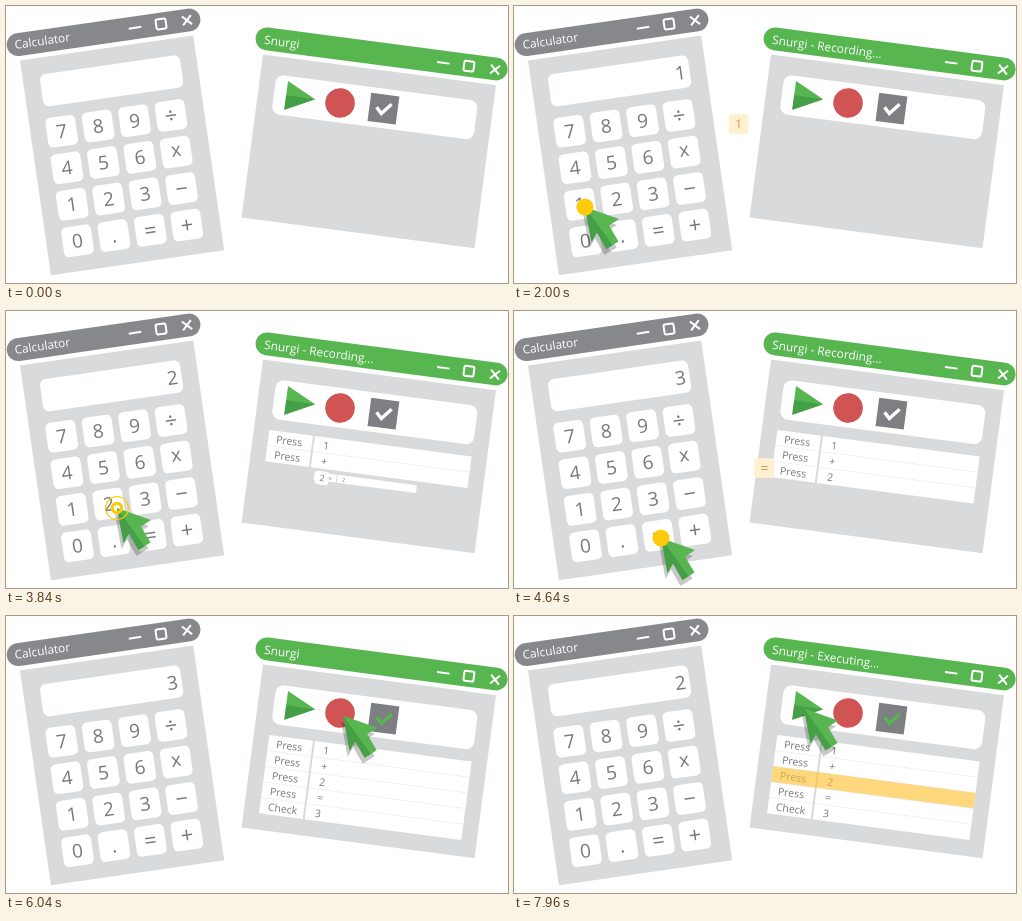
Recreate the animation shown at these times as an HTML page. Size 502 by 277 pixels, loop 8000 ms.

```html
<!DOCTYPE html>
<html lang="en">
<head>
<meta charset="utf-8">
<title>Calculator test recording</title>
<style>
  html, body { margin: 0; width: 100%; height: 100%; overflow: hidden; background: #fff; }
  svg { display: block; width: 100vw; height: 100vh; font-family: "Open Sans", "Noto Sans", sans-serif; }
  text { fill: #77787b; }
  .title { fill: #fff; font-size: 11.9px; }
  .cell { font-size: 10.5px; }
  .icon { fill: none; stroke: #fff; stroke-width: 2; }
</style>
</head>
<body>
<svg id="stage" viewBox="0 0 502 277"></svg>
<script>
const NS = "http://www.w3.org/2000/svg";
const GREEN = "#57b650", DARK_GREEN = "#459f47", GREY = "#86888b", PANEL = "#d9dadc", AMBER = "#ffc02e";
const LOOP = 8000, APP = "Snurgi";
const stage = document.getElementById("stage");

function add(parent, tag, attrs = {}, content = "") {
  const node = document.createElementNS(NS, tag);
  set(node, attrs);
  node.textContent = content;
  parent.appendChild(node);
  return node;
}
function set(node, attrs) {
  for (const key in attrs) node.setAttribute(key, attrs[key]);
}
const box = (parent, x, y, width, height, rx, fill) => add(parent, "rect", { x, y, width, height, rx, fill });
const clamp = v => Math.min(1, Math.max(0, v));
const span = (t, a, b) => clamp((t - a) / (b - a));
const mix = (a, b, p) => a + (b - a) * p;
const easeInOut = p => p < .5 ? 2 * p * p : 1 - 2 * (1 - p) ** 2;
const easeOut = p => 1 - (1 - p) ** 2;

// Linear interpolation through rows of [time, value, value, ...].
function track(rows, t) {
  if (t <= rows[0][0]) return rows[0].slice(1);
  for (let i = 1; i < rows.length; i++) {
    const a = rows[i - 1], b = rows[i];
    if (t <= b[0]) return a.slice(1).map((v, j) => mix(v, b[j + 1], span(t, a[0], b[0])));
  }
  return rows[rows.length - 1].slice(1);
}
// Last value whose start time has passed.
const latest = (steps, t) => steps.reduce((value, [start, next]) => t >= start ? next : value, "");

function makeWindow({ x, y, angle, width, height, bar, color, icons, midY, titleX, titleY }) {
  const g = add(stage, "g", { transform: `translate(${x} ${y}) rotate(${angle})` });
  box(g, 0, 0, width, height, 0, PANEL);
  box(g, bar[0], -27.4, bar[1], 22.8, 11.4, color);
  const [a, b, c] = icons;
  add(g, "path", { class: "icon", d: `M${a - 6.3} ${midY}h12.6` });
  add(g, "rect", { class: "icon", x: b - 5, y: midY - 5, width: 10, height: 10, rx: 1.5 });
  add(g, "path", { class: "icon", d: `M${c - 4.5} ${midY - 4.5}l9 9m0 -9l-9 9` });
  const title = add(g, "text", { class: "title", x: titleX, y: titleY });
  return { g, title };
}

// Calculator
const calcPos = { x: 14, y: 54.5, angle: -8.2 };
const calc = makeWindow({ ...calcPos, width: 175, height: 217, bar: [-11, 195.5], color: GREY,
  icons: [118.5, 144.8, 171], midY: -16, titleX: -3.2, titleY: -12 });
calc.title.textContent = "Calculator";
box(calc.g, 17, 17, 141.5, 32.5, 6, "#fff");
const display = add(calc.g, "text", { x: 154.5, y: 40.7, "font-size": 19, "text-anchor": "end" });

function keyLabel(parent, label, x, y) {
  const operator = "÷−=+".includes(label);
  const size = operator ? 22 : 19;
  const drop = operator ? 7.7 : label === "x" ? 4.4 : 6.8;
  return add(parent, "text", { x, y: y + drop, "font-size": size, "text-anchor": "middle" }, label);
}
const keys = {};
[..."789÷456x123−0.=+"].forEach((label, i) => {
  const x = 31.2 + i % 4 * 36.8, y = 76 + Math.floor(i / 4) * 36.9;
  box(calc.g, x - 15, y - 15, 30, 30, 5, "#fff");
  keyLabel(calc.g, label, x, y);
  keys[label] = [x, y];
});

// Recorder
const toolPos = { x: 257, y: 48.5, angle: 7.5 };
const tool = makeWindow({ ...toolPos, width: 235, height: 164.4, bar: [-9.5, 254], color: GREEN,
  icons: [179.8, 205.7, 232], midY: -15.3, titleX: -.6, titleY: -10.7 });
box(tool.g, 16, 18, 203.5, 39.5, 8, "#fff");
add(tool.g, "path", { d: "M28.3 23L57.5 37.5L28.3 52Z", fill: GREEN });
add(tool.g, "path", { d: "M28.3 37.5H57.5L28.3 52Z", fill: DARK_GREEN });
add(tool.g, "circle", { cx: 82.7, cy: 38, r: 14.8, fill: "#d15454" });
box(tool.g, 112.3, 23.8, 28.4, 28.4, 0, "#7d7f82");
const tick = add(tool.g, "path", { d: "M119.5 37.5L125 43L134 32.5", fill: "none", "stroke-width": 3.4 });

const ROW_TOP = 69, PITCH = 15.8, ROW_MID_X = 117.5;
const rowMid = i => ROW_TOP + (i + .5) * PITCH;
// value, and the moment the row reaches half size
const rows = [["1", 2080], ["+", 2960], ["2", 3840], ["=", 4720], ["3", 5440]].map(([value, start], i) => {
  const g = add(tool.g, "g"), y = -PITCH / 2, check = i === 4;
  box(g, -102, y, 44, PITCH, 0, "#fff");
  box(g, -56, y, 158, PITCH, 0, "#fff");
  if (i) add(g, "path", { d: `M-102 ${y}h44m2 0h158`, stroke: "#e4e5e6", "stroke-width": .7, "stroke-dasharray": "1 1" });
  const tint = check && box(g, -102, y, 204, PITCH, 0, "#44dd8d");
  add(g, "text", { class: "cell", x: -94, y: 4.1 }, check ? "Check" : "Press");
  add(g, "text", { class: "cell", x: -46.5, y: 4.1 }, value);
  const glow = box(g, -102, y, 204, PITCH, 0, AMBER);
  return { g, start, tint, glow };
});
const ROW_SCALE = [[-80, 0], [0, .5], [120, 1.11], [220, 1]];
const runs = [[6960, 7340], [7400, 7760], [7780, 8400]];

// Flying key labels
function toStage({ x, y, angle }, [u, v]) {
  const a = angle * Math.PI / 180;
  return [x + u * Math.cos(a) - v * Math.sin(a), y + u * Math.sin(a) + v * Math.cos(a)];
}
const tokens = [["1", 1780], ["+", 2660], ["2", 3540], ["=", 4420]].map(([label, click], i) => {
  const g = add(stage, "g");
  box(g, -15, -15, 30, 30, 5, "#fff");
  const glow = box(g, -15, -15, 30, 30, 5, AMBER);
  const text = keyLabel(g, label, 0, 0);
  return { g, glow, text, click, from: toStage(calcPos, keys[label]), to: toStage(toolPos, [74, rowMid(i) + 1.3]) };
});

// Pointer
const pointer = add(stage, "g");
const ARROW = "M0 0L34 12L24 18.5L33.5 34.5L21.5 42L12 25.5L6.5 35Z";
add(pointer, "path", { d: ARROW, transform: "translate(-2 6)", opacity: .22 });
add(pointer, "path", { d: ARROW, fill: GREEN });
add(pointer, "path", { d: "M0 0L27.5 38.2L21.5 42L12 25.5L6.5 35Z", fill: DARK_GREEN });

const RECORD = [335, 96], ONE = [71, 201], PLUS = [178, 223], TWO = [111, 197],
  EQUALS = [147, 227], CHECK = [385, 107], PLAY = [290, 92.5];
const moves = [
  [160, 400, RECORD, easeOut], [960, 1640, ONE, easeInOut], [2060, 2460, PLUS, easeInOut],
  [2980, 3400, TWO, easeInOut], [3880, 4320, EQUALS, easeInOut],
  [4760, 5240, CHECK, easeInOut], [5760, 6320, PLAY, easeInOut]
];
function pointerAt(t) {
  let at = [330, 290];
  for (const [start, end, to, ease] of moves) {
    const p = ease(span(t, start, end));
    at = at.map((v, i) => mix(v, to[i], p));
  }
  return at;
}

// Click rings: age, then outer and inner radius of both rings
const PULSE = [[0, 0, 0, 0, 0], [120, 8.5, 0, 0, 0], [220, 8.5, 0, 3, 0],
  [260, 11.5, 7.5, 6.2, 3], [300, 12, 10.8, 6.2, 3], [580, 13, 13, 7, 7]];
const clicks = [[680, RECORD], [1780, ONE], [2660, PLUS], [3540, TWO], [4420, EQUALS], [6620, PLAY]]
  .map(([start, [cx, cy]]) => ({ start, rings: [0, 1].map(() =>
    add(stage, "circle", { cx, cy, fill: "none", stroke: "#fecb0a" })) }));

const titles = [[0, APP], [920, APP + " - Recording..."], [5200, APP], [6840, APP + " - Executing..."]];
const readings = [[1840, "1"], [2720, "+"], [3600, "2"], [4480, "3"], [6960, "1"], [7400, "+"], [7780, "2"]];

function render(t) {
  tool.title.textContent = latest(titles, t);
  display.textContent = latest(readings, t);
  display.setAttribute("font-size", display.textContent === "+" ? 22 : 19);
  tick.setAttribute("stroke", t < 5280 ? "#fff" : GREEN);

  rows.forEach(({ g, start, tint, glow }, i) => {
    const [scale] = track(ROW_SCALE, t - start);
    set(g, { transform: `translate(${ROW_MID_X} ${rowMid(i)}) scale(${scale})`,
      visibility: scale > 0 ? "visible" : "hidden" });
    if (tint) tint.setAttribute("opacity", 1 - span(t, 5720, 6000));
    const run = runs[i];
    glow.setAttribute("opacity", run ? .62 * span(t, run[0], run[0] + 120) * (1 - span(t, run[1] - 120, run[1])) : 0);
  });

  tokens.forEach(({ g, glow, text, click, from, to }) => {
    const age = t - click, p = span(age, 90, 300);
    const x = mix(from[0], to[0], p), y = mix(from[1], to[1], p) - 176 * p * (1 - p);
    set(g, { transform: `translate(${x} ${y}) rotate(${mix(-8.2, 7.5, p)}) scale(${mix(1, .45, p)})`,
      visibility: age >= 90 && age < 365 ? "visible" : "hidden" });
    glow.setAttribute("opacity", .62 * (1 - p));
    text.style.fill = p < 1 ? "#c19f58" : "";
  });

  pointer.setAttribute("transform", `translate(${pointerAt(t)})`);
  clicks.forEach(({ start, rings }) => {
    const radii = track(PULSE, t - start);
    rings.forEach((ring, i) => {
      const [outer, inner] = radii.slice(i * 2);
      set(ring, { r: (outer + inner) / 2, "stroke-width": outer - inner });
    });
  });
}

const begin = performance.now();
function frame() {
  render((performance.now() - begin) % LOOP);
  requestAnimationFrame(frame);
}
frame();
</script>
</body>
</html>
```
